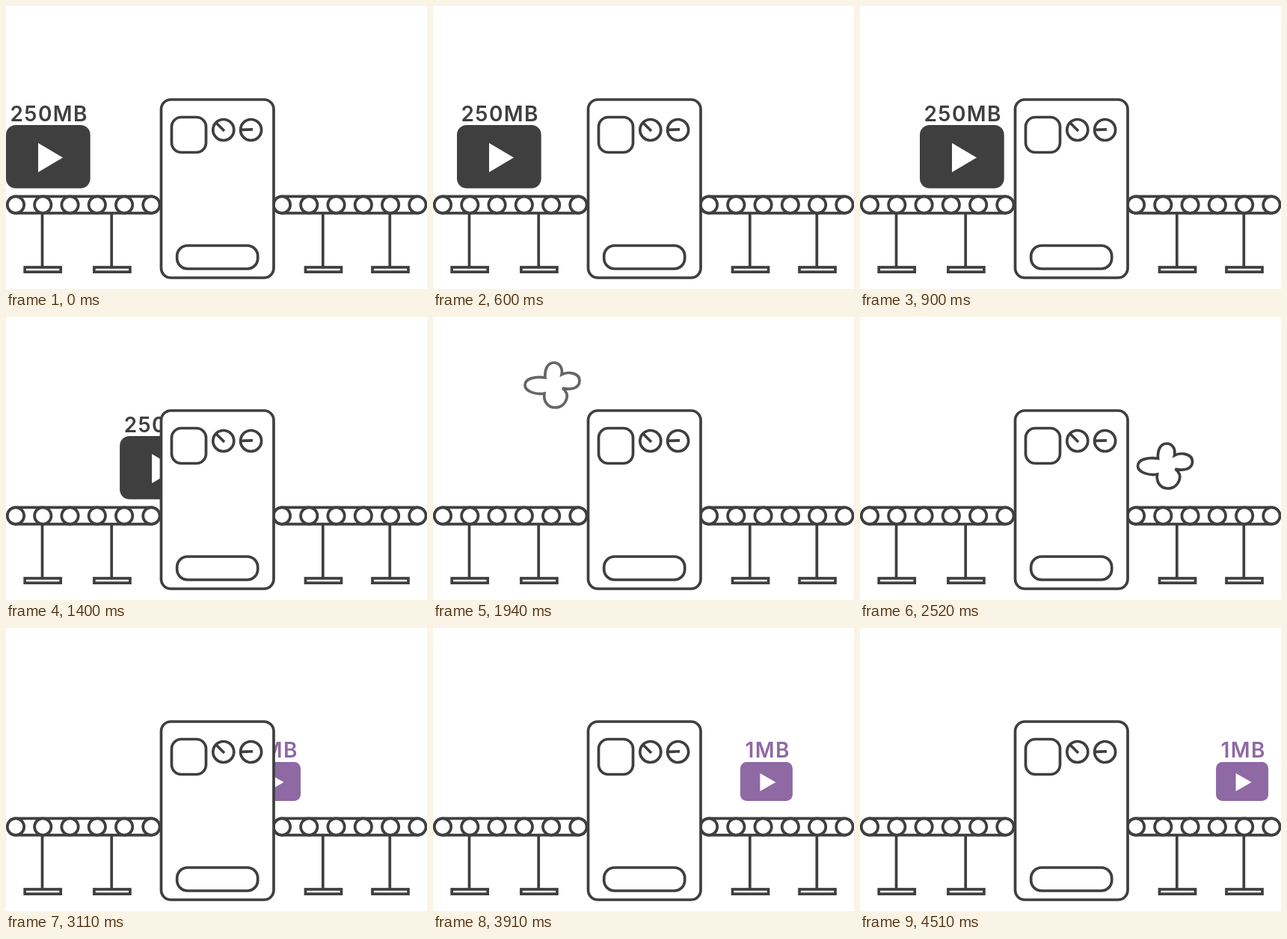
An HTML page that plays this animation: 563x378 px, repeating every 5.51 s.

```html
<!DOCTYPE html>
<html lang="en">
<head>
<meta charset="utf-8">
<title>Video compression machine</title>
<style>
  html, body { margin: 0; width: 100%; height: 100%; overflow: hidden; background: #fff; }
  svg { display: block; width: 100%; height: 100%; }
  text { font: 600 28px Inter, "Open Sans", sans-serif; letter-spacing: 1.4px; text-anchor: middle; }
  .line { fill: #fff; stroke: #3f3f3f; stroke-width: 3.7; }
</style>
</head>
<body>
<svg viewBox="0 0 563 378">
  <g id="large" fill="#3f3f3f">
    <text x="57.7" y="154">250MB</text>
    <rect y="159" width="112.7" height="84.6" rx="13"/>
    <path d="M43 183L76 202.5L43 222Z" fill="#fff"/>
  </g>
  <g id="small" fill="#8e69a4">
    <text x="36.7" y="173">1MB</text>
    <rect y="179" width="70" height="52" rx="8.5"/>
    <path d="M26.5 194L47.5 206L26.5 218Z" fill="#fff"/>
  </g>
  <path id="puff" class="line" d="M29 22C28 10 33 2 40.5 2S53 9 51 18C60 13 75 16 75 26S64 39 52 36
    C58 40 59 46 58 49C56 57 50 62 42 62S26 55 28 43C18 45 2 41 2 32S16 20 29 22Z"/>
  <g id="belts" class="line"></g>
  <g class="line">
    <rect x="207.5" y="125" width="150.5" height="238" rx="13"/>
    <rect x="221.5" y="148.5" width="46" height="47" rx="13"/>
    <circle cx="290.8" cy="165.5" r="14"/>
    <circle cx="327.6" cy="165.5" r="14"/>
    <path d="M281 156L292 167M315 165.3L330 164.8"/>
    <rect x="228.7" y="320" width="108" height="31" rx="14"/>
  </g>
</svg>
<script>
const LOOP = 5510;
const byId = id => document.getElementById(id);
const large = byId('large'), small = byId('small'), puff = byId('puff');

function belt(x, legs) {
  let out = `<rect x="${x + 1.8}" y="254.3" width="203.5" height="22.4" rx="11.2"/>`;
  for (let i = 0; i < 6; i++) out += `<circle cx="${x + 13 + i * 36.28}" cy="265.5" r="11.2"/>`;
  for (const leg of legs)
    out += `<path d="M${leg} 277V348"/><rect x="${leg - 23.3}" y="349" width="48" height="6.2"/>`;
  return out;
}
byId('belts').innerHTML = belt(0, [48.5, 141.2]) + belt(356, [423.8, 513.3]);

// Each puff: start time, x, y. It fades in until the next one replaces it.
const puffs = [
  [1700, 138, 190], [1850, 121, 59], [2000, 245, 12],
  [2150, 369, 190], [2300, 138, 143], [2400, 369.5, 167]
];

const steps = (t, start, length) => Math.floor((t - start) / length);

function largeX(t) {
  if (t < 500) return 0;
  if (t < 1000) return 16 * steps(t, 400, 100);
  if (t < 1700) return 80 + 14.43 * steps(t, 900, 100);
  return 181 + 14.43 * steps(t, 1670, 30);
}

function smallX(t) {
  if (t < 3110) return 264 + 10 * Math.min(5, steps(t, 2860, 30));
  return 324 + 10.86 * Math.min(14, steps(t, 3110, 100));
}

function place(node, visible, x, y = 0) {
  node.style.display = visible ? '' : 'none';
  if (visible) node.setAttribute('transform', `translate(${x} ${y})`);
}

function draw(t) {
  place(large, t < 1730, largeX(t));
  place(small, t >= 2860, smallX(t));

  const active = puffs.filter(p => t >= p[0]).pop();
  place(puff, active && t < 2730, ...(active || [0, 0, 0]).slice(1));
  if (active) {
    const fadeIn = Math.min(1, (steps(t, active[0], 30) + 1) / 5);
    const fadeOut = t < 2550 ? 1 : 1 - (steps(t, 2550, 30) + 1) / 7;
    puff.setAttribute('opacity', Math.max(0, Math.min(fadeIn, fadeOut)));
  }
}

const began = performance.now();
function tick() {
  draw((performance.now() - began) % LOOP);
  requestAnimationFrame(tick);
}
tick();
</script>
</body>
</html>
```
